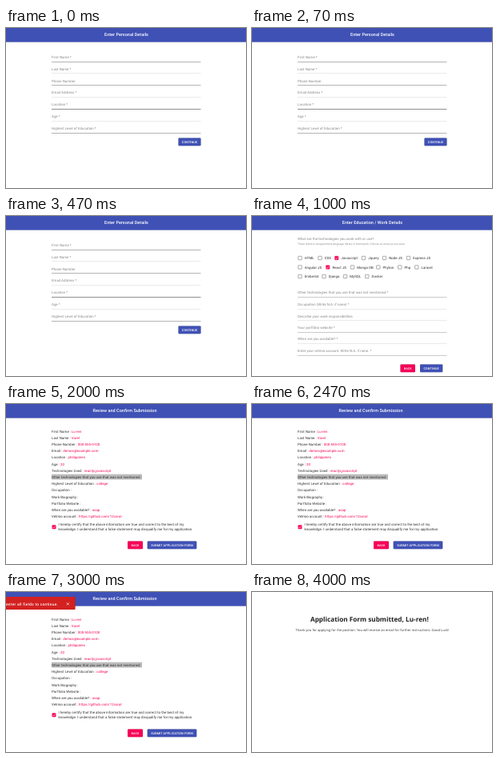
Write an HTML page that moves like this. It is 300 px wide and 200 px high and loops after 4.99 s.

```html
<!DOCTYPE html>
<html lang="en">
<head>
<meta charset="utf-8">
<title>Application form</title>
<style>
  html, body { margin: 0; width: 100%; height: 100%; overflow: hidden; background: #fff; }
  svg { display: block; width: 100vw; height: 100vh; }
  text { font-family: Roboto, sans-serif; text-rendering: geometricPrecision; white-space: pre; }
  .title { font-size: 5.46px; font-weight: 500; letter-spacing: .0075em; fill: #fff; text-anchor: middle; }
  .label { font-size: 4.37px; letter-spacing: .00938em; fill: #858585; }
  .hint { font-size: 3.28px; letter-spacing: .01em; fill: #858585; }
  .body { font-size: 4.37px; letter-spacing: .00938em; fill: #2c2c2c; }
  .body tspan { fill: #f50057; }
  .button { font-size: 3.82px; font-weight: 500; letter-spacing: .02857em; fill: #fff; text-anchor: middle; }
  .toast { font-size: 4.8px; font-weight: 500; letter-spacing: .28px; fill: #fff; }
  .done, .thanks { font-family: "Open Sans", sans-serif; }
  .done { font-size: 8.2px; font-weight: 700; fill: #212121; }
  .thanks { font-size: 4.11px; fill: #333; text-anchor: middle; }
  .raised { filter: drop-shadow(0 .6px .6px rgba(0, 0, 0, .35)); }
</style>
</head>
<body>
<svg id="stage" viewBox="0 0 300 200" preserveAspectRatio="none"></svg>
<script>
const BLUE = '#3f51b5', PINK = '#f50057', RED = '#d32020';
const LOOP = 4990;

const text = (kind, x, y, content) => `<text class="${kind}" x="${x}" y="${y}">${content}</text>`;
const rect = (x, y, w, h, fill, extra = '') =>
  `<rect x="${x}" y="${y}" width="${w}" height="${h}" fill="${fill}" ${extra}/>`;

const header = (title, x = 150.5) =>
  rect(0, 0, 300, 17.5, BLUE, 'class="raised"') + text('title', x, 10.2, title);

const button = (x, y, w, fill, caption) =>
  rect(x, y, w, 9.7, fill, 'rx="1" class="raised"') + text('button', x + w / 2, y + 6.2, caption);

const field = ([caption, y, lineY, lineColor]) =>
  text('label', 57, y + 1.5, caption) + rect(57, lineY, 186.5, 1, lineColor);

function checkbox(x, y, checked) {
  const box = `x="${x - 2.2}" y="${y - 2.2}" width="4.4" height="4.4" rx=".4"`;
  return checked
    ? `<rect ${box} fill="${PINK}" stroke="${PINK}" stroke-width=".5"/>
       <path d="M${x - 1.6} ${y + .1}l1.1 1.2 2.2 -2.4" fill="none" stroke="#fff" stroke-width=".6"/>`
    : `<rect ${box} fill="none" stroke="#757575" stroke-width=".6"/>`;
}

const DARK = '#909090', MID = '#b4b4b4', LIGHT = '#cacaca', FAINT = '#ebebeb';

const personal = header('Enter Personal Details') + [
  ['First Name *', 36, 42, MID],
  ['Last Name *', 51, 56, FAINT],
  ['Phone Number', 66, 71, MID],
  ['Email Address *', 80.7, 86, FAINT],
  ['Location *', 95.7, 101, DARK],
  ['Age *', 110.7, 116, FAINT],
  ['Highest Level of Education *', 125.6, 131, MID],
].map(field).join('') + button(215.5, 137.5, 28, BLUE, 'CONTINUE');

const skills = [
  [52.5, [60, 'HTML'], [85, 'CSS'], [105.8, 'Javascript', true], [139.5, 'Jquery'], [165.5, 'Node JS'], [195.5, 'Express JS']],
  [64, [60, 'Angular JS'], [94.8, 'React JS', true], [125.5, 'Mongo DB'], [157.8, 'Phyton'], [184.8, 'Php'], [205.8, 'Laravel']],
  [75.5, [60, 'Emberlot'], [90, 'Django'], [116.5, 'MySQL'], [143.8, 'Docker']],
].map(([y, ...items]) => items.map(([x, name, checked]) =>
  checkbox(x, y, checked) + text('body', x + 5.7, y + 1.5, name)).join('')).join('');

const education = header('Enter Education / Work Details') +
  text('label', 57, 30, 'What are the technologies you work with or use?') +
  text('hint', 57, 35.8, 'These refers to programming language, library or framework. Choose as many as you want') +
  skills + [
    ['Other technologies that you use that was not mentioned *', 95.7, 101, LIGHT],
    ['Occupation (Write N.A. if none) *', 110.5, 116, FAINT],
    ['Describe your work responsibilities', 125, 130, FAINT],
    ['Your portfolio website *', 139.2, 145, LIGHT],
    ['When are you available? *', 153.7, 159, FAINT],
    ['Enter your velmio account. Write N.A. if none. *', 168.3, 174, LIGHT],
  ].map(field).join('') +
  button(185.5, 185.5, 18.5, PINK, 'BACK') + button(210, 185.5, 28.3, BLUE, 'CONTINUE');

const answers = [
  ['First Name', 'Lu-ren'],
  ['Last Name', 'Varel'],
  ['Phone Number', '000-555-0100'],
  ['Email', 'demos@example.com'],
  ['Location', 'philippines'],
  ['Age', '20'],
  ['Technologies Used', 'reactjs,javascript'],
  ['Other technologies that you use that was not mentioned', ''],
  ['Highest Level of Education', 'college'],
  ['Occupation', ''],
  ['Work Biography', ''],
  ['Portfolio Website', ''],
  ['When are you available?', 'asap'],
  ['Velmio account', 'https://github.com/12coral'],
].map(([name, value], i) =>
  text('body', 57, 35.6 + i * 8.19, `${name} : <tspan>${value}</tspan>`)).join('');

const review = header('Review and Confirm Submission', 148.5) +
  rect(57, 87.7, 113, 6.8, '#bdbdbd') + answers +
  checkbox(60, 153.8, true) +
  text('body', 65.5, 151.7, 'I hereby certify that the above information are true and correct to the best of my') +
  text('body', 65.5, 158.4, 'knowledge. I understand that a false statement may disqualify me for my application.') +
  button(152, 171.5, 19, PINK, 'BACK') + button(176.7, 171.5, 61.6, BLUE, 'SUBMIT APPLICATION FORM');

const toast = rect(-10, 6, 96.5, 16, RED, 'rx="1" class="raised"') +
  text('toast', 0, 16.5, 'enter all fields to continue.') +
  '<path d="M75.8 13.4l3 3m0 -3l-3 3" stroke="#fff" stroke-width=".7"/>';

const submitted = text('done', 73, 36.5, 'Application Form submitted, Lu-ren!') +
  text('thanks', 150.2, 49.2, 'Thank you for applying for the position. You will receive an email for further instructions. Good Luck!');

// Each layer is visible from its start time until its end time.
const layers = [
  [0, 1000, personal],
  [1000, 2000, education],
  [2000, 4000, review],
  [3000, 4000, toast],
  [4000, LOOP, submitted],
];

const stage = document.getElementById('stage');
stage.innerHTML = layers.map(([, , content]) => `<g>${content}</g>`).join('');
const groups = [...stage.children];
const began = performance.now();

function draw(now) {
  const t = Math.max(0, now - began) % LOOP;
  layers.forEach(([start, end], i) => {
    groups[i].style.display = t >= start && t < end ? '' : 'none';
  });
  requestAnimationFrame(draw);
}
draw(began);
</script>
</body>
</html>
```
